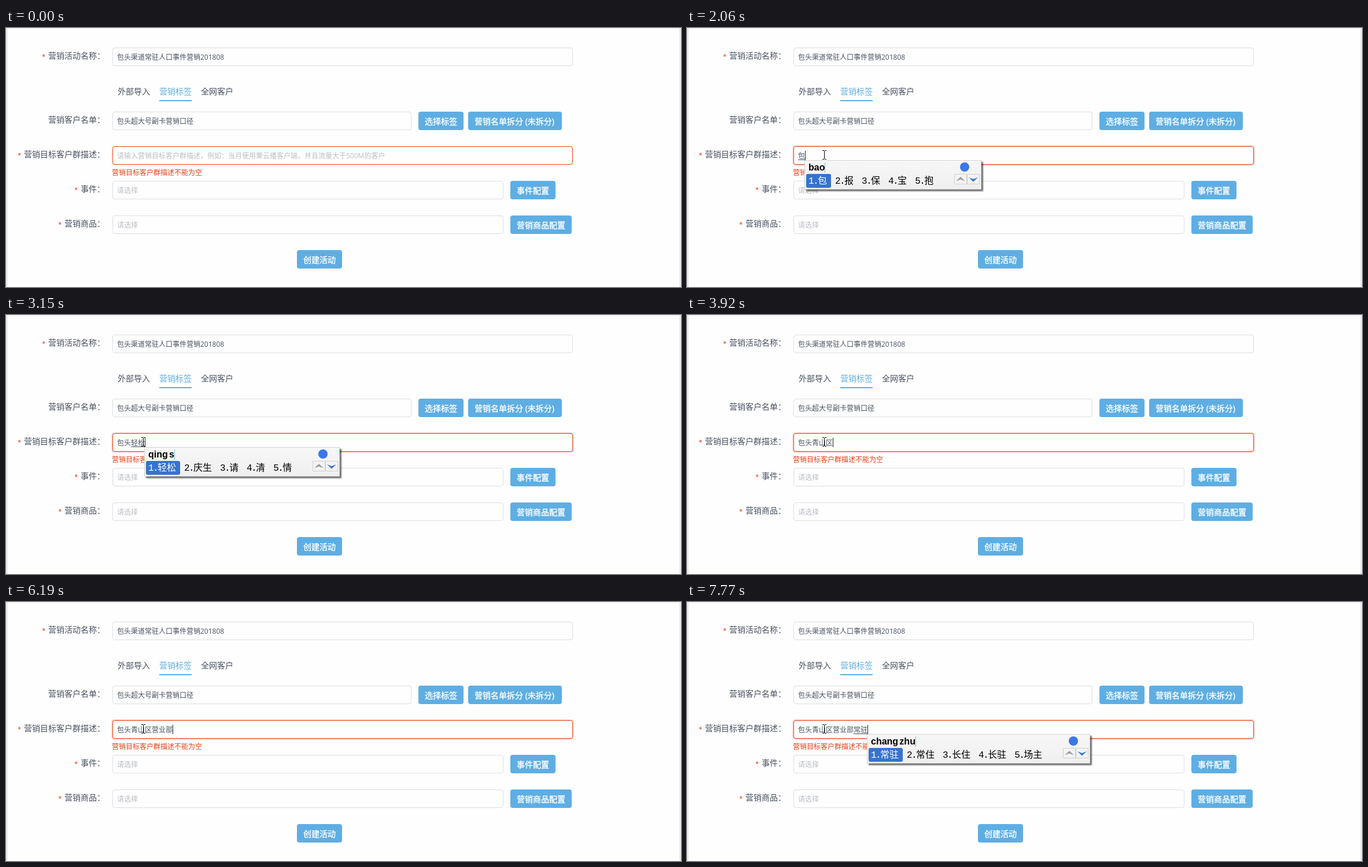
An HTML page that plays this animation: 1167x449 px, repeating every 8 s.

```html
<!DOCTYPE html>
<html lang="zh-CN">
<head>
<meta charset="utf-8">
<title>营销活动</title>
<style>
html, body { margin: 0; width: 100%; height: 100%; overflow: hidden; background: #ececec; }
body { position: relative; font-family: "Open Sans", "Noto Sans CJK SC", "Noto Sans CJK", sans-serif; color: #495060; }
div, svg { position: absolute; box-sizing: border-box; }
#panel { left: 3px; top: 1px; width: 1161px; height: 448px; background: #fefefe; }
.text { white-space: pre; line-height: 20px; font-size: 12px; }
.big { font-size: 14px; }
.label { font-size: 14px; color: #495060; }
.star { font: 14px/20px "Liberation Mono", monospace; color: #ed3f14; }
.hint { color: #bbbec4; }
.error { color: #ed3f14; }
.blue { color: #5eaee3; }
.white { font-size: 14px; font-weight: 500; color: #fff; -webkit-text-stroke: .35px #fff; }
.field { height: 32px; border: 1px solid #dddee1; border-radius: 4px; background: #fefefe; }
.button { height: 32px; border-radius: 4px; background: #5eaee3; }
.bad { border-color: #ed3f14; }
#comp { left: 0; top: 228px; height: 1px; background: #495060; }
#caret { top: 213px; width: 1px; height: 16px; background: #222; }
#ime { top: 229px; height: 51px; border: 1px solid #d4d4d4; background: linear-gradient(#f7f7f7, #efefef); box-shadow: 3px 3px 2px rgba(0,0,0,.55); color: #000; }
#pinyin { left: 6px; top: 2px; white-space: pre; font: bold 16px/20px "Liberation Sans", sans-serif; word-spacing: -2.2px; }
#pinyin::after { content: ""; position: absolute; left: 100%; top: 1px; width: 1px; height: 18px; background: #6cc4e8; }
#list { left: 2px; top: 23px; height: 24px; display: flex; white-space: pre; font-size: 16px; line-height: 22px; }
#list span { padding: 0 7px 0 4px; margin-right: 3px; height: 24px; border-radius: 3px; }
#list span:first-child { background: #3673cf; color: #fff; }
#list i { font: 16px/1 "Liberation Mono", monospace; letter-spacing: -1.6px; }
#dot { right: 20px; top: 3px; width: 16px; height: 16px; border-radius: 50%; background: #3b78e7; }
#pager { right: 1px; top: 23px; }
</style>
</head>
<body>
<div id="panel"></div>
<div id="form"></div>
<div id="comp"></div>
<div id="caret"></div>
<div id="ime">
  <div id="pinyin"></div>
  <div id="list"></div>
  <div id="dot"></div>
  <svg id="pager" width="45" height="19">
    <path d="M.5 .5h21v17h-21zM22.5 .5h21v17h-21z" fill="#f3f3f3" stroke="#cfcfcf"/>
    <path d="M3 12.5L11 5l8 7.5-8-3z" fill="#9a9a9a"/>
    <path d="M25 6l8 7.5L41 6l-8 3z" fill="#3673cf"/>
  </svg>
</div>
<svg id="ring" width="21" height="21" style="left:226px;top:210px">
  <circle cx="10.5" cy="10.5" r="10" fill="none" stroke="#000"/>
  <circle cx="10.5" cy="10.5" r="9" fill="none" stroke="#fff"/>
</svg>
<svg id="arrow" width="12" height="19">
  <path d="M.5 .8v15.4l3.5-3.4 2.4 5.5 2.2-1-2.4-5.3h5z" fill="#fff" stroke="#000"/>
</svg>
<svg id="beam" width="7" height="16">
  <path d="M0 .5h3M4 .5h3M3.5 1v14M0 15.5h3M4 15.5h3" stroke="#000" fill="none"/>
</svg>
<script>
const LOOP = 8000, TEXT_X = 192, CHAR = 12;
const $ = id => document.getElementById(id);
const form = $('form');

function add(cls, x, y, w, str) {
  const el = document.createElement('div');
  el.className = cls;
  el.style.left = x + 'px';
  el.style.top = y + 'px';
  if (w) el.style.width = w + 'px';
  if (str) el.textContent = str;
  form.appendChild(el);
  return el;
}
const text = (cls, x, midY, str) => add('text ' + cls, x, midY - 10, 0, str);
const field = (x, y, w) => add('field', x, y, w);

function label(midY, str, required) {
  const x = 171 - 14 * str.length;
  text('label', x, midY, str);
  if (required) text('star', x - 12, midY + 4, '*');
}
function button(x, y, w, str) {
  add('button', x, y, w);
  text('white', x + 11, y + 17, str);
}

label(48, '营销活动名称：', true);
field(184, 34, 796);
text('', TEXT_X, 51, '包头渠道常驻人口事件营销201808');

text('big', 193, 110, '外部导入');
text('big blue', 265, 110, '营销标签');
text('big', 337, 110, '全网客户');
add('', 265, 125, 56).style.cssText += 'height:2px;background:#5eaee3';

label(159, '营销客户名单：');
field(184, 145, 517);
text('', TEXT_X, 162, '包头超大号副卡营销口径');
button(713, 145, 78, '选择标签');
button(799, 145, 162, '营销名单拆分 (未拆分)');

label(219, '营销目标客户群描述：', true);
const target = field(184, 205, 796);
target.classList.add('bad');
const hint = text('hint', TEXT_X, 222, '请输入营销目标客户群描述，例如：当月使用栗云播客户端，并且流量大于500M的客户');
const value = text('', TEXT_X, 222, '');
text('error', 183, 251, '营销目标客户群描述不能为空');

label(279, '事件：', true);
field(184, 265, 676);
text('hint', TEXT_X, 282, '请选择');
button(872, 265, 78, '事件配置');

label(339, '营销商品：', true);
field(184, 325, 676);
text('hint', TEXT_X, 342, '请选择');
button(872, 325, 106, '营销商品配置');
button(503, 385, 78, '创建活动');

// time, committed text, pinyin, candidates
const A = '包头', B = A + '青山区', C = B + '营业部';
const typing = [
  [0, ''],
  [1790, '', 'b', '不 吧 把 被 本'],
  [1920, '', 'ba', '吧 把 八 爸 拔'],
  [2060, '', 'bao', '包 报 保 宝 抱'],
  [2180, '', 'bao t', '包头 抱团 爆头 报摊 保条'],
  [2300, '', 'bao tou', '包头 爆头 报头 抱头 包'],
  [2600, A],
  [2730, A, 'q', '去 请 前 起 却'],
  [2880, A, 'qi', '其 起 期 七 气'],
  [3000, A, 'qing', '请 清 情 轻 青'],
  [3150, A, 'qing s', '轻松 庆生 请 清 情'],
  [3300, A, 'qing sha', '青山 轻纱 青沙 清杀 请'],
  [3460, A, 'qing shan qu', '青山区 青山 庆山 请 清'],
  [3920, B],
  [4070, B, 'y', '一 有 也 要 与'],
  [4200, B, 'yi', '一 以 已 亿 意'],
  [4350, B, 'ying', '应 英 影 硬 营'],
  [4470, B, 'ying ye', '营业 影业 应 硬 英'],
  [4590, B, 'ying ye bu', '营业部 营业 影业 应 硬'],
  [5640, C],
  [5920, C, 'c', '才 从 出 次 成'],
  [6190, C],
  [6310, C, 'c', '才 从 出 次 成'],
  [6430, C, 'ch', '出 成 处 车 吃'],
  [6550, C, 'cha', '查 差 茶 插 叉'],
  [6690, C, 'chan', '产 禅 缠 颤 馋'],
  [6820, C, 'chang', '常 长 场 唱 厂'],
  [7650, C, 'chang z', '常在 长在 场中 长子 厂子'],
  [7770, C, 'chang zhu', '常驻 常住 长住 长驻 场主']
];
const carets = [[0, 0], [1240, 1], [2460, 0], [2600, 1], [5220, 0], [5640, 1], [7220, 0], [7650, 1]];
const glows = [[0, 0], [1240, .1], [1360, .2]];
const rings = [[0, 0], [1100, 1], [1240, 0]];
const mouse = [[0, ''], [270, 'arrow', 171, 68], [430, 'arrow', 209, 180], [550, 'beam', 234, 208], [690, 'beam', 234, 212]];

const at = (table, t) => table.findLast(row => row[0] <= t);
const show = (el, on) => { el.style.visibility = on ? 'visible' : 'hidden'; };

function drawTyping([, done, pinyin, list]) {
  const words = list ? list.split(' ') : [];
  const comp = words[0] || '';
  const start = TEXT_X + CHAR * done.length;
  const end = start + CHAR * comp.length;
  value.textContent = done + comp;
  show(hint, !value.textContent);
  $('comp').style.left = start + 'px';
  $('comp').style.width = end - start + 'px';
  $('caret').style.left = end + 'px';
  $('ime').style.display = pinyin ? 'block' : 'none';
  if (!pinyin) return;
  const chars = words.join('').length;
  $('ime').style.left = end - 1 + 'px';
  $('ime').style.width = 226 + 16 * chars + 'px';
  $('pinyin').textContent = pinyin;
  $('list').innerHTML = words.map((w, i) => `<span><i>${i + 1}.</i>${w}</span>`).join('');
}

let last;
function draw(t) {
  const row = at(typing, t);
  if (row !== last) drawTyping(last = row);
  show($('caret'), at(carets, t)[1]);
  show($('ring'), at(rings, t)[1]);
  target.style.boxShadow = `0 0 0 2px rgba(237,63,20,${at(glows, t)[1]})`;
  const [, kind, x, y] = at(mouse, t);
  for (const id of ['arrow', 'beam']) {
    show($(id), id === kind);
    $(id).style.left = x + 'px';
    $(id).style.top = y + 'px';
  }
}

const began = performance.now();
function tick() {
  draw((performance.now() - began) % LOOP);
  requestAnimationFrame(tick);
}
tick();
</script>
</body>
</html>
```
